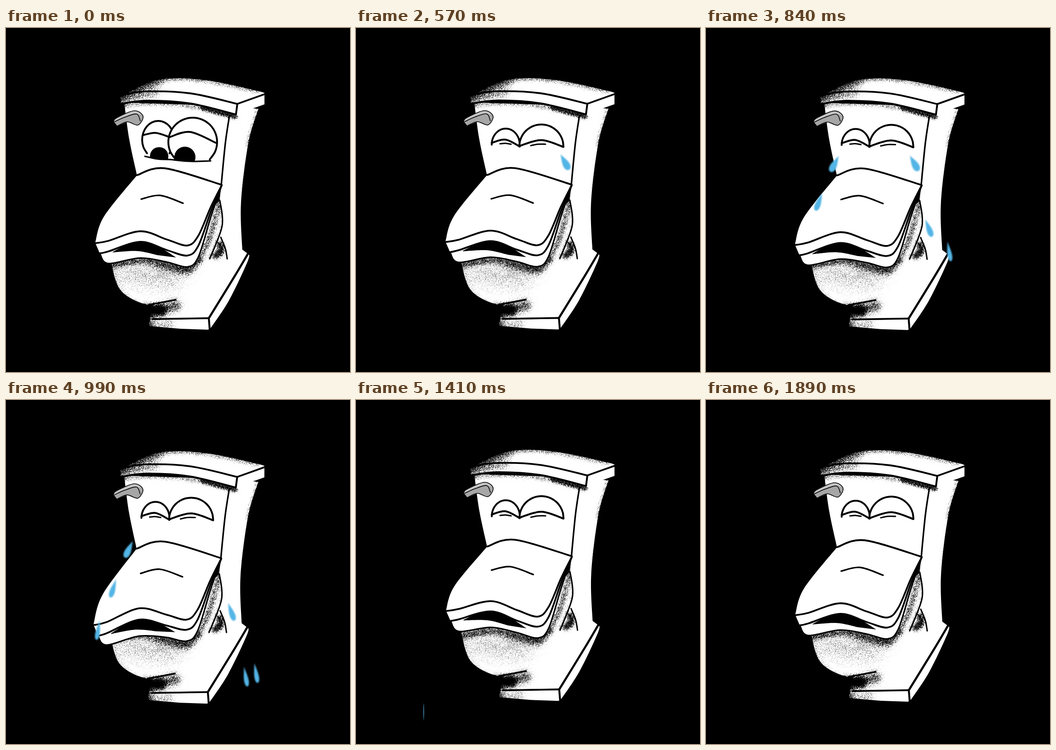
An HTML page with a canvas for the animation above (1920 ms loop, 748 px wide and 748 px high).

```html
<!DOCTYPE html>
<html lang="en">
<head>
<meta charset="utf-8">
<title>Sobbing toilet</title>
<style>
html, body { margin: 0; width: 100%; height: 100%; overflow: hidden; background: #000; }
canvas { display: block; width: 748px; height: 748px; }
</style>
</head>
<body>
<canvas id="stage" width="748" height="748"></canvas>
<script>
const SIZE = 748, LOOP = 1920, STEP = 30;
let c = document.getElementById('stage').getContext('2d');
let bend = 0;    // body pose: negative rises, positive slumps
let lip = false; // seat parts follow the extra lip bend

// ---------- motion ----------
const clamp = k => Math.max(0, Math.min(1, k));
const mix = (a, b, k) => a + (b - a) * k;
const ease = (t, from, to) => {
  const k = clamp((t - from) / (to - from));
  return k * k * (3 - 2 * k);
};

// breathe in, slump, rebound, settle
const pose = t => -.5 * ease(t, 510, 700) + 1.5 * ease(t, 760, 930)
  - 1.45 * ease(t, 1290, 1420) + .25 * ease(t, 1500, 1770) + .2 * ease(t, 1830, 1890);

function warp(x, y) {
  const slope = (y - 110) * .004;
  const e = lip ? Math.exp(-(((x - 195) / 120) ** 2) - ((y - 490) / 95) ** 2) : 0;
  return [x - bend * (slope + 2.5 * e), y + bend * (2 + slope + 19 * e)];
}

// ---------- drawing helpers ----------
// smooth curve through a flat list of x, y
function trace(list, joined) {
  const p = [];
  for (let i = 0; i < list.length; i += 2) p.push(warp(list[i], list[i + 1]));
  joined ? c.lineTo(...p[0]) : c.moveTo(...p[0]);
  for (let i = 0; i < p.length - 1; i++) {
    const a = p[i - 1] || p[i], b = p[i], d = p[i + 1], e = p[i + 2] || d;
    c.bezierCurveTo(b[0] + (d[0] - a[0]) / 6, b[1] + (d[1] - a[1]) / 6,
      d[0] - (e[0] - b[0]) / 6, d[1] - (e[1] - b[1]) / 6, d[0], d[1]);
  }
}

function shape(...parts) {
  c.beginPath();
  parts.forEach((p, i) => trace(p, i > 0));
  c.closePath();
}

function fill(color, ...parts) {
  shape(...parts);
  c.fillStyle = color;
  c.fill();
}

function line(list, width = 3.8) {
  c.beginPath();
  trace(list);
  c.lineWidth = width;
  c.stroke();
}

function clipped(parts, paint) {
  c.save();
  shape(...parts);
  c.clip();
  paint();
  c.restore();
}

function soft(blur, alpha, width, list) {
  c.filter = `blur(${blur}px)`;
  c.globalAlpha = alpha;
  line(list, width);
  c.filter = 'none';
  c.globalAlpha = 1;
}

function back(list) {
  return list.map((v, i) => list[list.length - 2 - i + 2 * (i % 2)]);
}
const lower = (list, dy) => list.map((v, i) => v + (i % 2) * dy);

// soft black shading broken into random ink grains
function grain(seed, paint) {
  const cv = document.createElement('canvas'), main = c;
  cv.width = cv.height = SIZE;
  c = cv.getContext('2d');
  c.lineCap = c.lineJoin = 'round';
  paint();
  const img = c.getImageData(0, 0, SIZE, SIZE), d = img.data;
  for (let i = 3; i < d.length; i += 4) {
    seed = (Math.imul(seed, 1664525) + 1013904223) >>> 0;
    const a = d[i] / 255;
    if (a > .012) d[i] = 255 * clamp((a - seed / 2 ** 32) * 1.8 + a);
  }
  c.putImageData(img, 0, 0);
  c = main;
  return cv;
}

// ---------- contours ----------
const tankTop = [249,149, 330,113, 430,113, 548,137, 562,144];
const tankEdge = [249,147, 300,138, 400,142, 503,165];
const tankRim = [250,165, 305,158, 400,164, 499,188];
const tankLeft = [257,162, 268,242, 285,321];
const tankRight = [549,176, 527,250, 511,380, 514,484];
const bowlRim = [228,508, 250,571, 310,602, 369,591];
const neck = [465,375, 470,430, 443,502];
const baseTop = [526,491, 497,540, 441,631];
const baseSide = [526,491, 526,506, 485,592, 444,654];
const lidBack = [285,320, 345,305, 469,341];
const lidLeft = [194,467, 213,410, 285,320];
const bowl = [bowlRim, [400,575], [443,502], back(neck), [440,400], [300,470]];

// wavy lip contour, d px below the front of the lid
function lipLine(d, sag) {
  const edge = Math.min(d, 22);
  return [194 + edge * .45, 468 + edge, 222, 463 + d, 292, 442 + d + sag, 350, 460 + d,
    394, 473 + d * .95, 418, 452 + d * .95, 445, 390 + d * .45, 469, 342];
}
const lidFront = lipLine(0, 0), lidUnder = lipLine(23, 0), seatUnder = lipLine(49, 9);

// ---------- shading ----------
const tankGrain = grain(7, () => {
  soft(5, .6, 9, tankTop.slice(0, 8));
  soft(9, .6, 26, [245,146, 330,112]);
  soft(7, .6, 12, [246,146, 249,168]);
  soft(7, .4, 16, [255,157, 330,140]);
});

const bodyGrain = grain(21, () => {
  soft(5, .55, 9, lower(tankRim, 5));
  soft(3, .9, 7, [425,173, 499,193]);
  soft(6, .75, 14, [556,172, 532,255]);
  soft(5, .5, 6, [534,250, 518,350]);
});

const bowlGrain = grain(43, () => {
  clipped(bowl, () => {
    soft(20, .28, 60, [255,530, 360,545]);
    soft(4, .25, 6, bowlRim);
    soft(4, .4, 7, neck);
  });
  soft(5, .9, 14, [465,470, 468,486, 454,496]);
  soft(6, 1, 26, [290,616, 335,613]);
  soft(8, .75, 20, [335,614, 372,604]);
  soft(7, .9, 26, [300,630, 306,660]);
  soft(8, .45, 16, [320,645, 360,645]);
});

const lipGrain = grain(85, () => {
  soft(7, .85, 14, lower(seatUnder.slice(2, 12), 5));
  soft(10, .45, 18, [330,524, 400,530]);
  soft(6, .75, 10, [418,508, 444,452, 468,366]);
});

// ---------- parts ----------
function drawBody() {
  fill('#fff', tankLeft, [469,342], [443,500], back(tankRight), [499,170]);
  c.drawImage(bodyGrain, 0, bend * 2.3);
  fill('#fff', [514,482], baseSide, [439,656], [380,654], [310,648], [320,600], [369,560], [443,480]);
  fill('#fff', ...bowl);
  c.drawImage(bowlGrain, -bend, bend * 3.7);
  clipped([[200,480], bowlRim, [400,590], [443,502], back(neck), [469,345], [300,400]],
    () => c.drawImage(lipGrain, -bend * 2, bend * 6));

  line([486,190, 477,250, 468,342], 3.4);
  line(neck, 3);
  line([467,455, 477,480, 481,502], 3);
  line(bowlRim.slice(-4));
  line(baseTop, 4.6);
  line([318,633, 380,632, 441,631]);
  line([441,631, 443,656], 4.2);
}

function drawTank() {
  fill('#fff', tankTop, [562,166], [499,188], back(tankRim));
  c.drawImage(tankGrain, 0, bend * 2);
  line(tankEdge);
  line([503,165, 562,144]);
  line([503,165, 500,188], 4);
  line(tankRim, 4.2);
}

function drawHandle() {
  const top = [234,203, 241,195, 279,180, 298,192, 287,211, 264,204];
  fill('#a6a6a6', top, [242,213]);
  fill('#c4c4c4', [234,203, 241,195, 279,180, 296,190], [284,186, 258,193, 236,204]);
  line([236,204, 258,194, 284,187, 292,202], 1.6);
  line([...top, 242,213], 1.6);
}

const eyes = [
  { x: 331, y: 243, rx: 35, ry: 41, pupil: [333,279,20], shutRy: 35, wrinkle: [313,252, 325,251, 337,253],
    lid: [298,233, 325,228, 355,237], low: [302,279, 330,285, 357,286], shut: [295,250, 325,243, 356,258] },
  { x: 406, y: 248, rx: 53, ry: 53, pupil: [389,281,23], shutRy: 48, wrinkle: [380,256, 395,253, 412,253],
    lid: [354,238, 400,226, 457,250], low: [357,286, 400,290, 445,289], shut: [355,257, 403,244, 451,259] }
];

function drawEye(e, k) {
  const close = list => list.map((v, i) => mix(v, e.shut[i], k));
  const lid = close(e.lid), low = close(e.low), [x0, y0, , , x1, y1] = e.shut;
  const x = mix(e.x, (x0 + x1) / 2, k), y = mix(e.y, (y0 + y1) / 2, k);
  const rx = mix(e.rx, (x1 - x0) / 2, k), ry = mix(e.ry, e.shutRy, k);
  const out = [], dip = .8 * (1 - k);
  for (let i = 0; i <= 12; i++) {
    const a = Math.PI + dip - (Math.PI + 2 * dip) * i / 12;
    out.push(x + rx * Math.cos(a), y - ry * Math.sin(a));
  }
  fill('#fff', out);
  if (k < 1) clipped([lid, back(low)], () => {
    const [px, py, r] = e.pupil;
    c.beginPath();
    c.arc(px, py - 30 * k, r, 0, 7);
    c.fillStyle = '#000';
    c.fill();
  });
  line(out, 4);
  line(lid, 4);
  line(low, 3.2);
  if (k > .85) line(e.wrinkle, 3);
}

function drawSeat() {
  lip = true;
  fill('#fff', lidLeft, lidBack, back(seatUnder));
  fill('#000', [232,487, 262,472, ...lidUnder.slice(4, 6), 335,478, 370,499], [330,494, 285,485, 232,488]);
  line(lidBack);
  line(lidFront);
  line(lidUnder);
  line(seatUnder, 3.2);
  line([294,372, 335,364, 385,381], 3.4);
  lip = false;
}

const streams = [
  { n: 3, start: 665, gap: 110, x: 300, y: 250, vx: -.32, drag: .00004, vy: .69, g: .00025 },
  { n: 2, start: 673, gap: 127, x: 443, y: 250, vx: .247, drag: 0, vy: 1.11, g: 0 },
  { n: 1, start: 523, gap: 0, x: 435, y: 258, vx: .429, drag: -.00042, vy: .72, g: 0 }
];

function drawTear(s, q) {
  const h = (19 + Math.min(3, s * .01)) * Math.min(1, .5 + s / 30);
  const r = Math.max(5, 8 - s * .01);
  c.save();
  c.translate(q.x + q.vx * s + q.drag * s * s, q.y + q.vy * s + q.g * s * s);
  c.rotate(-Math.atan(Math.max(.17, .62 - .0014 * s) * Math.sign(q.vx)));
  c.beginPath();
  c.moveTo(0, -h);
  c.bezierCurveTo(r * .5, -h * .4, r, 0, r, h * .4);
  c.bezierCurveTo(r, h * 1.15, -r, h * 1.15, -r, h * .4);
  c.bezierCurveTo(-r, 0, -r * .5, -h * .4, 0, -h);
  c.fillStyle = '#53b5e6';
  c.fill();
  c.restore();
}

function drawTears(t) {
  c.save();
  c.beginPath();
  c.rect(146, 0, 602, 697);
  c.clip();
  c.filter = 'blur(1.8px)';
  for (const q of streams) {
    for (let i = 0; i < q.n; i++) {
      const s = t - q.start - i * q.gap;
      if (s >= 0) drawTear(s, q);
    }
  }
  c.restore();
}

function draw(t) {
  bend = pose(t);
  c.fillStyle = '#000';
  c.fillRect(0, 0, SIZE, SIZE);
  drawBody();
  drawTank();
  drawHandle();
  eyes.forEach(e => drawEye(e, ease(t, 210, 390)));
  drawSeat();
  drawTears(t);
}

c.lineCap = c.lineJoin = 'round';
const begin = performance.now();
function tick(now) {
  const t = Math.max(0, now - begin) % LOOP;
  draw(Math.floor(t / STEP) * STEP);
  requestAnimationFrame(tick);
}
draw(0);
requestAnimationFrame(tick);
</script>
</body>
</html>
```
